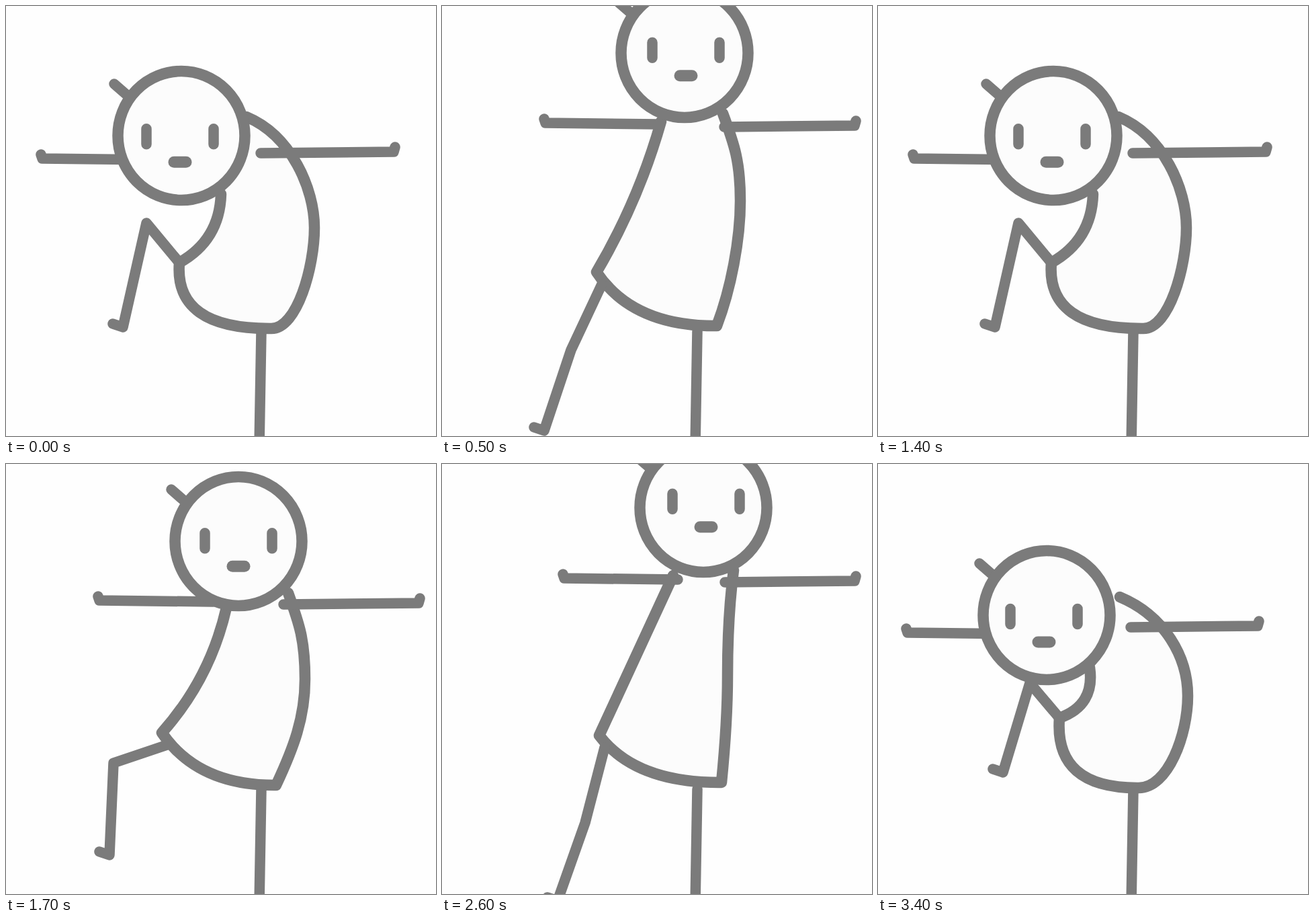
An HTML page for the animation above (3500 ms loop, 640 px wide and 640 px high).

```html
<!DOCTYPE html>
<html lang="en">
<head>
<meta charset="utf-8">
<title>Bouncing figure</title>
<style>
  html, body { margin: 0; width: 100%; height: 100%; overflow: hidden; background: #fefefe; }
  svg { display: block; width: 100vw; height: 100vh; }
  path, ellipse { stroke: #7b7b7b; stroke-width: 15.5; stroke-linecap: round; stroke-linejoin: round; fill: none; }
  #body, #head { fill: #fcfcfc; stroke-width: 16.5; }
  #mouth { stroke-width: 17; }
</style>
</head>
<body>
<svg viewBox="0 0 640 640">
  <path id="body"/>
  <path id="leg"/>
  <path id="stand" d="M380 484L377 655"/>
  <path id="arms"/>
  <path id="hair"/>
  <ellipse id="head" rx="94.5" ry="96"/>
  <path id="eyes"/>
  <path id="mouth"/>
</svg>
<script>
const LOOP = 3500, STEP = 100;

// Joints from the deepest crouch (level 0) to the full stretch (level 4).
const poses = [
  { head: [251, 225], neck: [315, 303], nape: [360, 198], back: [461, 345],
    hip: [270, 378], shoulder: [376, 243], knee: [226, 326], foot: [186, 459] },
  { head: [261, 193], neck: [320, 280], nape: [358, 165], back: [459, 330],
    hip: [258, 382], shoulder: [379, 219], knee: [209, 323], foot: [174, 478] },
  { head: [346, 115], neck: [328, 214], nape: [420, 192], back: [445, 320],
    hip: [232, 400], shoulder: [413, 209], knee: [160, 445], foot: [154, 582] },
  { head: [361, 70], neck: [326, 172], nape: [418, 160], back: [444, 290],
    hip: [230, 396], shoulder: [420, 180], knee: [192, 512], foot: [152, 632] },
  { head: [389, 65], neck: [344, 166], nape: [434, 158], back: [425, 315],
    hip: [234, 404], shoulder: [421, 176], knee: [213, 534], foot: [172, 650] }
];

// Each bounce springs up in one step and sinks back evenly: [step, level].
const bounce = [
  [0, 1], [1, 4.2], [4, 1], [5, 3], [9, 0], [10, 3], [14, 1], [15, 3], [19, 1],
  [20, 1], [21, 4], [25, 0], [26, 4], [30, 0], [31, 4.2], [34, 0], [35, 1]
];

const el = id => document.getElementById(id);
const setPath = (id, d) => el(id).setAttribute("d", d);
const lerp = (a, b, k) => a + (b - a) * k;
const clamp = v => Math.max(0, Math.min(1, v));
const add = ([x, y], dx, dy) => [x + dx, y + dy];
const line = (...points) => "M" + points.join("L");

// Control point that bows the curve from p to q sideways by d.
function bow([px, py], [qx, qy], d) {
  const k = 2 * d / Math.hypot(qx - px, qy - py);
  return [(px + qx) / 2 + (qy - py) * k, (py + qy) / 2 - (qx - px) * k];
}

function levelAt(step) {
  const n = bounce.findIndex(([s]) => s > step);
  const [s0, v0] = bounce[n - 1], [s1, v1] = bounce[n];
  return lerp(v0, v1, (step - s0) / (s1 - s0));
}

function jointsAt(level) {
  const i = Math.min(Math.floor(level), poses.length - 2);
  const joints = {};
  for (const name in poses[i])
    joints[name] = poses[i][name].map((v, n) => lerp(v, poses[i + 1][name][n], level - i));
  return joints;
}

function drawBody({ neck, nape, back, hip }, level, upright) {
  const base = [388 + 7 * level, 482 - 2 * level];
  const front = bow(neck, hip, 18 * (1 - (level / 4) ** 2));
  const hem = [hip[0] - 8 + 62 * upright, base[1] + 1];
  const seat = add(base, 0.6 * (back[0] - base[0]), -55 * upright);
  const collar = add(nape, 0.66 * (back[0] - nape[0]), 28 + 18 * upright);
  setPath("body", `M${neck}Q${front} ${hip}Q${hem} ${base}` +
    `C${seat} ${add(back, 0, 58)} ${back}C${add(back, 0, -58)} ${collar} ${nape}`);
}

function drawHead(head, level) {
  el("head").setAttribute("cx", head[0]);
  el("head").setAttribute("cy", head[1]);
  setPath("hair", line(add(head, -100, -77), add(head, -77, -57)));
  // The face turns and lifts as the figure rises.
  const face = add(head, 2 * level - 4, 2 - 0.7 * level ** 2);
  setPath("eyes", [-50, 50].map(x => line(add(face, x, -11.5), add(face, x, 11.5))).join(""));
  setPath("mouth", line(add(face, -9, 38), add(face, 9, 38)));
}

function drawArms(head, shoulder, level, upright) {
  const right = [565 + 12 * clamp(level) + 37 * upright, shoulder[1] - 2];
  const left = [head[0] - 207, shoulder[1] + 8 - 14 * upright];
  setPath("arms",
    line(shoulder, right, add(right, 2, -7)) +
    line([head[0] - 38, left[1] + 2], left, add(left, -2, -6)));
}

function draw(level) {
  const joints = jointsAt(level);
  const { head, shoulder, hip, knee, foot } = joints;
  const upright = clamp(level - 1);
  drawBody(joints, level, upright);
  setPath("leg", line(add(hip, 8 * upright, 18 * upright), knee, foot, add(foot, -15, -5)));
  drawArms(head, shoulder, level, upright);
  drawHead(head, level);
}

const start = performance.now();
function tick() {
  const t = (performance.now() - start) % LOOP;
  draw(levelAt(Math.floor(t / STEP)));
  requestAnimationFrame(tick);
}
tick();
</script>
</body>
</html>
```
